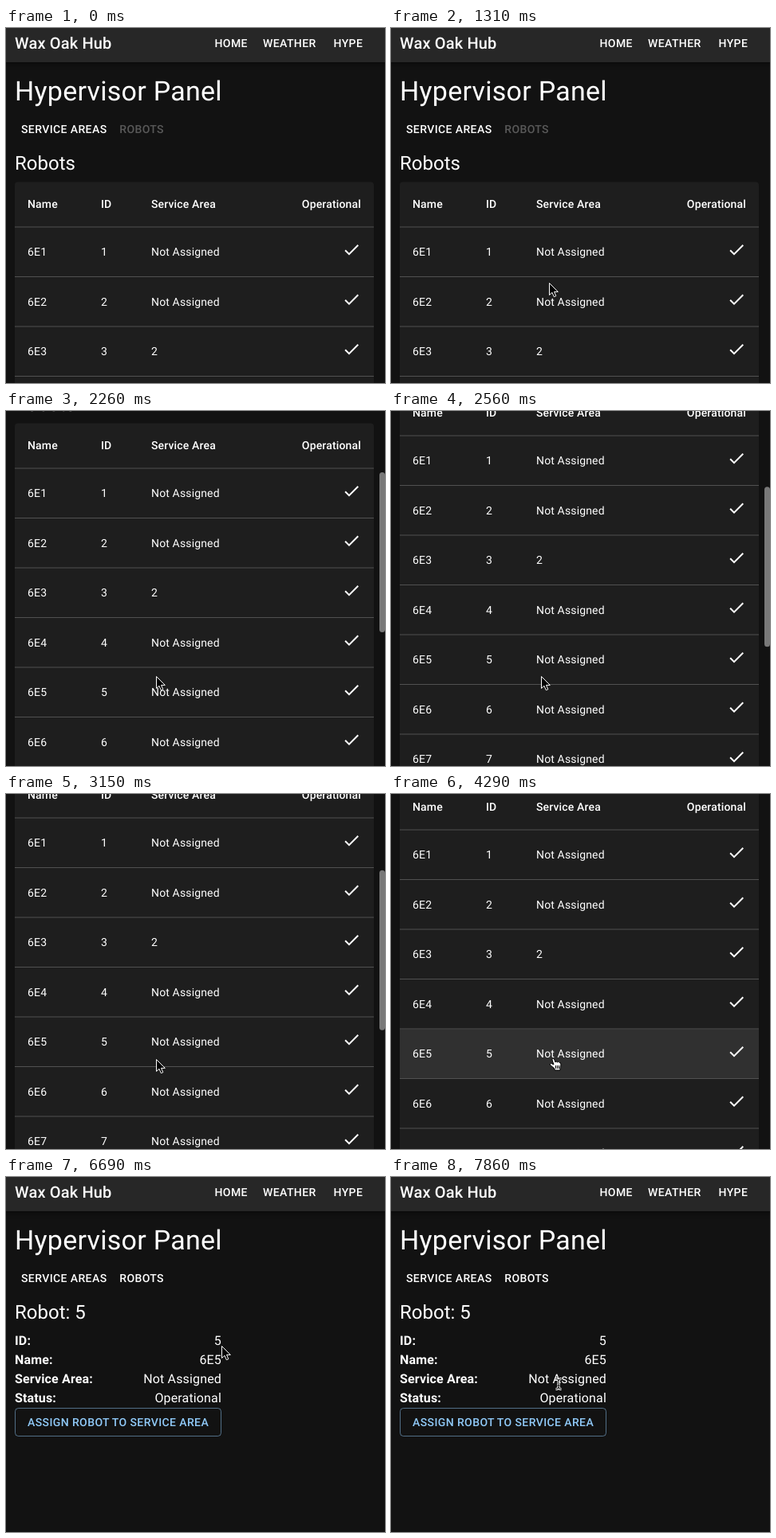
Animation, 475 px wide and 446 px high, one loop 8000 ms. Source, as an HTML page:

```html
<!DOCTYPE html>
<html lang="en">
<head>
<meta charset="utf-8">
<title>Hypervisor Panel</title>
<style>
html, body { margin: 0; width: 475px; height: 446px; overflow: hidden; background: #121212; }
svg { display: block; }
text { font-family: Roboto, sans-serif; fill: #fff; text-rendering: geometricPrecision; }
.brand { font-size: 20px; font-weight: 500; letter-spacing: .0075em; }
.h4 { font-size: 34px; letter-spacing: .00735em; }
.h5 { font-size: 24px; }
.btn { font-size: 14px; font-weight: 500; letter-spacing: .02857em; }
.cell, .head { font-size: 14px; letter-spacing: .01071em; }
.head { font-weight: 500; }
.body, .label { font-size: 16px; letter-spacing: .00938em; }
.label { font-weight: 700; }
.end { text-anchor: end; }
#bar { filter: drop-shadow(0 2px 3px rgba(0, 0, 0, .5)); }
</style>
</head>
<body>
<svg id="stage" width="475" height="446" viewBox="0 0 475 446"></svg>
<script>
const text = (x, y, cls, str, attrs = '') =>
  `<text x="${x}" y="${y}" class="${cls}" ${attrs}>${str}</text>`;
const rect = (x, y, w, h, fill, attrs = '') =>
  `<rect x="${x}" y="${y}" width="${w}" height="${h}" fill="${fill}" ${attrs}/>`;

const ROW = 62.5;
const lineY = i => 249.5 + ROW * i;

function robotRow(i) {
  const n = i + 1, y = lineY(i) + 36.5;
  return rect(11, lineY(i), 450, 1, '#515151') +
    text(27, y, 'cell', '6E' + n) +
    text(119, y, 'cell', n) +
    text(182, y, 'cell', n === 3 ? 2 : 'Not Assigned') +
    `<path transform="translate(421 ${y - 19.5})" fill="#fff"
      d="M9 16.17 4.83 12l-1.42 1.41L9 19 21 7l-1.41-1.41z"/>`;
}

const details = [['ID:', 5], ['Name:', '6E5'], ['Service Area:', 'Not Assigned'], ['Status:', 'Operational']];
const detailRow = ([label, value], i) =>
  text(11, 211 + 24 * i, 'label', label) + text(270, 211 + 24 * i, 'body end', value);

document.getElementById('stage').innerHTML = `
<g id="page">
  ${rect(-10, -10, 495, 53, '#272727', 'id="bar"')}
  ${text(11, 26, 'brand', 'Wax Oak Hub')}
  ${text(261.5, 24, 'btn', 'HOME')}${text(322, 24, 'btn', 'WEATHER')}${text(410.5, 24, 'btn', 'HYPE')}
  ${text(11, 91, 'h4', 'Hypervisor Panel')}
  ${text(19, 132, 'btn', 'SERVICE AREAS')}${text(142.3, 132, 'btn', 'ROBOTS', 'id="robots"')}
  ${text(11, 178, 'h5', '', 'id="title"')}
  <g id="list">
    ${rect(11, 193.5, 450, 800, '#1e1e1e', 'rx="4"')}
    ${rect(11, lineY(4) + 1, 450, ROW - 1, '#fff', 'id="hover"')}
    ${text(27, 226, 'head', 'Name')}${text(119, 226, 'head', 'ID')}
    ${text(182, 226, 'head', 'Service Area')}${text(445, 226, 'head end', 'Operational')}
    ${Array.from({ length: 10 }, (_, i) => robotRow(i)).join('')}
  </g>
  <g id="detail">
    ${details.map(detailRow).join('')}
    ${rect(11.5, 290.5, 258, 35, 'none', 'rx="4" stroke="#90caf9" stroke-opacity=".5"')}
    ${text(27, 313, 'btn', 'ASSIGN ROBOT TO SERVICE AREA', 'style="fill:#90caf9"')}
  </g>
</g>
${rect(468, 0, 7, 201, '#797979', 'id="thumb" rx="3.5"')}
<g id="cursor">
  <path id="arrow" fill="#000" stroke="#fff" stroke-linejoin="round"
    d="M.5 .5V15.5L4 12.3 6.3 17.7 8.8 16.7 6.5 11.4H11.3Z"/>
  <g id="hand" transform="translate(0 1)" stroke="#000" stroke-linejoin="round">
    <path fill="#fff" d="M0 4Q0 1 2.5 3L4 7Q5 5 6.5 7 8 5.5 9 7.5 11 7 11 10L10 14V17H3V15L-3 10Q-2 7 0 9L2 10Z"/>
    <path d="M4.5 11V15M6.5 11V15M8.5 11V15"/>
  </g>
  <g id="beam" fill="none">
    <path id="stem" stroke="#fff" stroke-width="3"
      d="M-3.5-6.5Q0-6.5 0-4 0-6.5 3.5-6.5M0-4V4M-3.5 6.5Q0 6.5 0 4 0 6.5 3.5 6.5M-2 2H2"/>
    <path id="core" stroke="#000"/>
  </g>
</g>`;

const $ = id => document.getElementById(id);
$('core').setAttribute('d', $('stem').getAttribute('d'));

const show = (id, on) => $(id).setAttribute('display', on ? 'inline' : 'none');
const ramp = (t, a, b) => Math.min(1, Math.max(0, (t - a) / (b - a)));
const easeOut = (t, a, b) => 1 - (1 - ramp(t, a, b)) ** 2;
const bend = (a, c, b, u) => a * (1 - u) ** 2 + 2 * c * u * (1 - u) + b * u * u;

const scrollAt = t => Math.round(223 * easeOut(t, 1738, 2690) - 18 * easeOut(t, 3080, 3870));

// Each move bends from the previous end, past a control point, to its own end.
const moves = [
  { start: 410, stop: 1190, via: [378, 90], to: [222, 284] },
  { start: 1190, stop: 1490, via: [200, 318], to: [188, 333] },
  { start: 3870, stop: 4290, via: [195, 331], to: [202, 329] },
  { start: 6090, stop: 6690, via: [160, 270], to: [270, 212] },
  { start: 7050, stop: 7860, via: [198, 300], to: [210, 260] },
];

function mouseAt(t) {
  let at = [8, 344];
  for (const { start, stop, via, to } of moves) {
    const u = easeOut(t, start, stop);
    at = at.map((v, k) => bend(v, via[k], to[k], u));
  }
  return at.map(Math.round);
}

function draw(t) {
  const onList = t < 4770;
  const scroll = onList ? scrollAt(t) : 0;
  $('page').setAttribute('transform', `translate(0 ${-scroll})`);
  $('title').textContent = onList ? 'Robots' : 'Robot: 5';
  $('robots').style.fillOpacity = .3 + .7 * ramp(t, 4740, 4950);
  show('list', onList);
  show('detail', t >= 5610);
  $('hover').setAttribute('opacity', .08 * ramp(t, 3900, 4080));

  show('thumb', t >= 1790 && onList);
  $('thumb').setAttribute('y', scroll * .449 - 3);
  $('thumb').setAttribute('opacity', 1 - ramp(t, 3990, 4290));

  const kind = t >= 3930 && onList ? 'hand' : t >= 7350 ? 'beam' : 'arrow';
  show('cursor', t >= 410);
  $('cursor').setAttribute('transform', `translate(${mouseAt(t)})`);
  for (const k of ['arrow', 'hand', 'beam']) show(k, k === kind);
}

function tick() {
  draw(performance.now() % 8000);
  requestAnimationFrame(tick);
}
tick();
</script>
</body>
</html>
```
